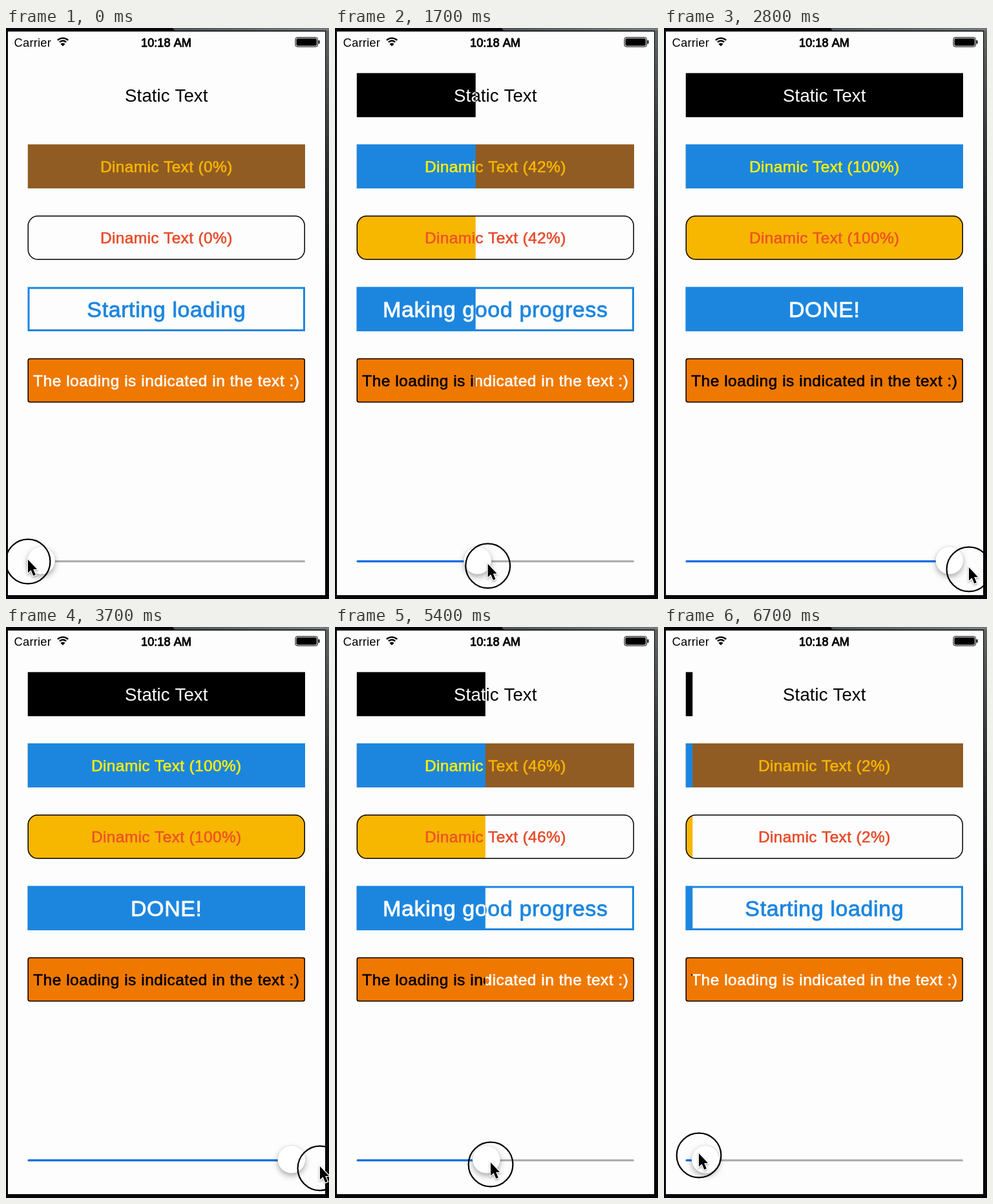
These frames come from a looping animation (500 by 883 pixels, 6.8 s). An HTML page with a canvas:

```html
<!DOCTYPE html>
<html lang="en">
<head>
<meta charset="utf-8">
<title>Loading bars</title>
<style>
html, body { margin: 0; width: 100%; height: 100%; overflow: hidden; background: #05070a; }
canvas { display: block; }
</style>
</head>
<body>
<canvas id="stage" width="500" height="883"></canvas>
<script>
const ctx = document.getElementById('stage').getContext('2d');
const LOOP = 6800, STEP = 100;
const LEFT = 33.5, WIDTH = 429.5, HEIGHT = 68.5;
const BLUE = '#1c86df';

// time, progress, pointer x, pointer y
const keys = [
  [0, 0, 34, 825], [200, 0, 36, 825], [1200, .196, 132, 826], [2200, .7145, 359, 837],
  [2800, 1, 472, 837], [3700, 1, 486, 837], [4050, 1, 472, 837],
  [4700, .753, 368, 831], [5400, .464, 241, 831], [6700, .025, 54, 817]
];

// Slope at a key that never overshoots: harmonic mean of its neighbours
function slope(i, c) {
  if (i === 0 || i === keys.length - 1) return 0;
  const rate = j => (keys[j + 1][c] - keys[j][c]) / (keys[j + 1][0] - keys[j][0]);
  const a = rate(i - 1), b = rate(i);
  return a * b > 0 ? 2 * a * b / (a + b) : 0;
}

function valueAt(t, c) {
  let i = 0;
  while (i < keys.length - 2 && t >= keys[i + 1][0]) i++;
  const a = keys[i], b = keys[i + 1], d = b[0] - a[0], u = (t - a[0]) / d, v = 1 - u;
  return a[c] * (1 + 2 * u) * v * v + b[c] * (3 - 2 * u) * u * u
    + d * u * v * (slope(i, c) * v - slope(i + 1, c) * u);
}

function rect(x, y, w, h, color) {
  ctx.fillStyle = color;
  ctx.fillRect(x, y, w, h);
}

function box(x, y, w, h, r) {
  ctx.beginPath();
  ctx.roundRect(x, y, w, h, r);
}

function circle(x, y, r) {
  ctx.beginPath();
  ctx.arc(x, y, r, 0, 7);
}

function label(text, x, y, size, color, { weight = 0, gap = 0, align = 'center' } = {}) {
  ctx.font = size + 'px "Liberation Sans", Arial, sans-serif';
  ctx.textAlign = align;
  ctx.letterSpacing = gap + 'px';
  ctx.fillStyle = ctx.strokeStyle = color;
  ctx.lineWidth = weight;
  ctx.lineJoin = 'round';
  const base = y + size * .358;
  ctx.fillText(text, x, base);
  if (weight) ctx.strokeText(text, x, base);
}

function drawDevice() {
  rect(0, 0, 500, 883, '#05070a');
  const top = ctx.createLinearGradient(258, 0, 500, 0);
  top.addColorStop(0, '#4d5152');
  top.addColorStop(1, '#747878');
  ctx.fillStyle = top;
  ctx.beginPath();
  ctx.moveTo(258, 0);
  ctx.lineTo(500, 0);
  ctx.lineTo(500, 4);
  ctx.lineTo(261, 4);
  ctx.fill();
  const side = ctx.createLinearGradient(0, 0, 0, 420);
  side.addColorStop(0, '#5f6465');
  side.addColorStop(.5, '#2b2f31');
  side.addColorStop(1, '#05070a');
  rect(495, 4, 5, 416, side);
  rect(3, 5.5, 491, 871.5, '#fdfdfd');
}

function drawStatus() {
  label('Carrier', 12.5, 22, 18.4, '#000', { align: 'left', gap: .2 });
  label('10:18 AM', 248, 22, 18.2, '#000', { weight: .9 });
  ctx.strokeStyle = ctx.fillStyle = '#000';
  ctx.lineWidth = 2.4;
  for (const r of [7.2, 11.4]) {
    ctx.beginPath();
    ctx.arc(88, 27, r, -2.36, -.78);
    ctx.stroke();
  }
  ctx.beginPath();
  ctx.moveTo(88, 28.2);
  ctx.arc(88, 28.2, 5, -2.36, -.78);
  ctx.fill();
  ctx.lineWidth = 1;
  box(448, 14.5, 34.5, 14.5, 3);
  ctx.stroke();
  box(449.5, 16, 31.5, 11.5, 2);
  ctx.fill();
  box(483.5, 19, 2, 5.5, 1);
  ctx.fill();
}

function drawBar(bar, p) {
  const { y, text, size, style, back, fill, ink, inkOver, border, line = 0, radius = 0 } = bar;
  const edge = LEFT + WIDTH * p, top = y - HEIGHT / 2;
  ctx.save();
  box(LEFT, top, WIDTH, HEIGHT, radius);
  ctx.clip();
  if (back) rect(LEFT, top, WIDTH, HEIGHT, back);
  rect(LEFT, top, edge - LEFT, HEIGHT, fill);
  ctx.restore();
  for (const [x, w, color] of [[LEFT, edge - LEFT, inkOver], [edge, LEFT + WIDTH - edge, ink]]) {
    ctx.save();
    ctx.beginPath();
    ctx.rect(x, top, w, HEIGHT);
    ctx.clip();
    label(text, 248.3, y, size, color, style);
    ctx.restore();
  }
  if (line) {
    ctx.strokeStyle = border;
    ctx.lineWidth = line;
    ctx.lineJoin = 'miter';
    box(LEFT + line / 2, top + line / 2, WIDTH - line, HEIGHT - line, radius);
    ctx.stroke();
  }
}

function stageText(p) {
  if (p >= 1) return 'DONE!';
  return ['Starting loading', 'Making good progress', 'Half way done!', 'Almost done...'][Math.floor(p * 4)];
}

function drawBars(p) {
  const percent = `Dinamic Text (${Math.floor(p * 100)}%)`;
  const medium = { weight: .6, gap: .35 };
  [
    { y: 103.7, text: 'Static Text', size: 27.6, style: { gap: .1 },
      fill: '#000', ink: '#000', inkOver: '#fff' },
    { y: 214, text: percent, size: 24.5, style: medium,
      back: '#915c23', fill: BLUE, ink: '#f6b500', inkOver: '#fff000' },
    { y: 324.3, text: percent, size: 24.5, style: medium, fill: '#f7b600',
      ink: '#e54b29', inkOver: '#ee5424', border: '#000', line: 1.5, radius: 15 },
    { y: 434.7, text: stageText(p), size: 34, style: { weight: .85, gap: .6 },
      fill: BLUE, ink: BLUE, inkOver: '#fff', border: BLUE, line: 3 },
    { y: 545, text: 'The loading is indicated in the text :)', size: 24.5, style: { weight: .6, gap: .52 },
      back: '#ef7800', fill: '#ef7800', ink: '#fff', inkOver: '#000', border: '#000', line: 1.5, radius: 3 }
  ].forEach(bar => drawBar(bar, p));
}

function drawSlider(p) {
  const x = 54.5 + 387.5 * p;
  box(LEFT, 823.3, WIDTH, 3, 1.5);
  ctx.fillStyle = '#a9a9a9';
  ctx.fill();
  box(LEFT, 823.3, x - LEFT, 3, 1.5);
  ctx.fillStyle = '#0b6bea';
  ctx.fill();
  ctx.save();
  ctx.shadowColor = 'rgba(0,0,0,.32)';
  ctx.shadowBlur = 9;
  ctx.shadowOffsetY = 4;
  circle(x, 823.3, 21.5);
  ctx.fillStyle = '#fff';
  ctx.fill();
  ctx.restore();
  ctx.strokeStyle = 'rgba(0,0,0,.1)';
  ctx.lineWidth = .8;
  ctx.stroke();
}

function drawPointer(x, y) {
  circle(x, y, 34.4);
  ctx.strokeStyle = '#000';
  ctx.lineWidth = 2.2;
  ctx.stroke();
  ctx.save();
  ctx.translate(x, y - 3);
  ctx.beginPath();
  for (const [px, py] of [[0, 0], [0, 20.5], [4.6, 16.3], [8.3, 25], [11.8, 23.5], [8.2, 15], [14, 15]])
    ctx.lineTo(px, py);
  ctx.closePath();
  ctx.shadowColor = 'rgba(0,0,0,.35)';
  ctx.shadowBlur = 3;
  ctx.shadowOffsetY = 1.5;
  ctx.strokeStyle = '#fff';
  ctx.lineWidth = 2.6;
  ctx.lineJoin = 'miter';
  ctx.stroke();
  ctx.shadowColor = 'transparent';
  ctx.fillStyle = '#000';
  ctx.fill();
  ctx.restore();
}

const start = performance.now();

function draw() {
  const elapsed = Math.max(0, performance.now() - start) % LOOP;
  const t = Math.floor(elapsed / STEP) * STEP;
  const p = valueAt(t, 1);
  drawDevice();
  drawStatus();
  drawBars(p);
  drawSlider(p);
  drawPointer(valueAt(t, 2), valueAt(t, 3));
  requestAnimationFrame(draw);
}
draw();
</script>
</body>
</html>
```
